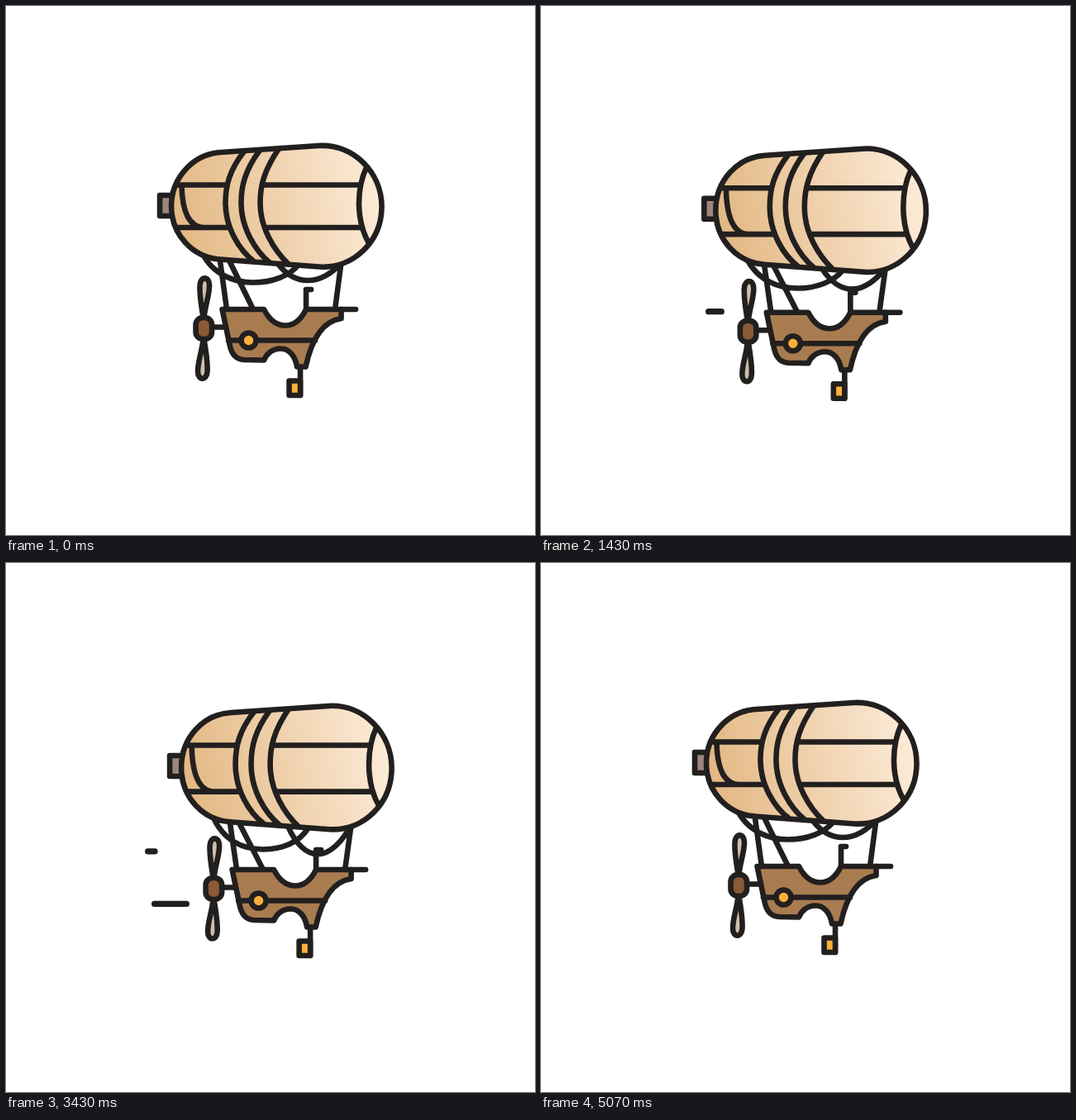
Animation of 640 by 640 pixels, one loop 5140 ms. Source, as an HTML page:

```html
<!DOCTYPE html>
<html lang="en">
<head>
<meta charset="utf-8">
<title>Airship</title>
<style>
html, body { margin: 0; width: 100%; height: 100%; overflow: hidden; background: #fff; }
svg { display: block; width: 100vw; height: 100vh; }
</style>
</head>
<body>
<svg viewBox="0 0 640 640">
  <defs>
    <linearGradient id="skin" gradientUnits="userSpaceOnUse" x1="212" y1="262" x2="448" y2="212">
      <stop offset="0" stop-color="#e3b985"/>
      <stop offset="1" stop-color="#fdebd8"/>
    </linearGradient>
  </defs>
  <g id="ship" fill="none" stroke="#221f1f" stroke-width="6.6" stroke-linecap="round" stroke-linejoin="round">
    <path id="streaks" stroke-width="7.2"/>
    <path id="ropes" stroke-linecap="butt"/>
    <path fill="#9c877e" d="M186 229H202V254H186Z"/>
    <path id="body" fill="url(#skin)"/>
    <path id="seams" stroke-linecap="butt"/>
    <path d="M250 388.5H266M363 367V343H369M356 436V471"/>
    <path fill="#a97c50" d="M261.5 367H312C317 377 325 386.5 338 386.5C350 386.5 358 377 363 367H405.5V378C383 381 370 402 362.5 436.5H352C350 424 343 414.5 332 414.5C322 414.5 315 421 312 428.5L288 428C277 427.5 273 420 271 412Z"/>
    <path d="M405 367H423M269 404.5H374"/>
    <circle cx="293.5" cy="404.5" r="9" fill="#fbae3c"/>
    <path id="lamp" fill="#fbb03b"/>
    <path id="blades" fill="#cec0a8"/>
    <rect x="229.5" y="377" width="19.5" height="26" rx="8.5" fill="#8a5a36"/>
  </g>
</svg>
<script>
const LOOP = 5140, FRAME = LOOP / 72;
const el = id => document.getElementById(id);
const [ship, streaks, ropes, body, seams, lamp, blades] =
  ['ship', 'streaks', 'ropes', 'body', 'seams', 'lamp', 'blades'].map(el);
const clamp = v => Math.max(0, Math.min(1, v));
const ease = p => (1 - Math.cos(Math.PI * p)) / 2;

// propeller span: [step, scale]
const SPAN = [[0, 1], [2, 1], [13, 0], [20, 1], [23.5, 1], [35.7, 0], [48, 1], [59, 0], [71, 1], [72, 1]];
// wind streaks: [start ms, y]
const WIND = [
  [246, 366.5], [453, 407.5], [770, 390], [1322, 366], [1600, 425], [1900, 350], [2205, 393],
  [2523, 436], [2890, 345], [3156, 408.5], [3600, 380], [4045, 362], [4450, 400]
];

function span(t) {
  const f = t / FRAME;
  const i = Math.max(1, SPAN.findIndex(k => k[0] > f));
  const [a, b] = [SPAN[i - 1], SPAN[i]];
  return a[1] + (b[1] - a[1]) * ease((f - a[0]) / (b[0] - a[0]));
}

function drawWind(t) {
  return WIND.map(([start, y]) => {
    const u = (t - start) / 600;
    if (u <= 0 || u >= 1) return '';
    const head = 207 - 47.5 * clamp(u / 0.55);
    const tail = 207 - 47.5 * clamp((u - 0.45) / 0.55);
    return `M${tail} ${y}H${head}`;
  }).join('');
}

function drawBody(b) {
  const m = b / 2;
  return `M260 177L378 169C420 166.5 454.5 ${201 + m / 2} 454.5 ${242.5 + m}` +
    `C454.5 ${285 + b} 420 ${318 + b} 379 ${315.5 + b}L259 ${306.5 + b}` +
    `C226 ${304 + b} 200 ${277 + b} 200 ${242 + m}C200 207 227 179 260 177Z`;
}

function drawSeams(b, low) {
  const hoop = (x, top, end) => `M${x + 22.5} ${top}C${x + 5} 198 ${x - 0.5} 218 ${x} ${240 + b / 2}` +
    `C${x + 0.5} ${268 + b} ${x + 16} ${295 + b} ${x + 34.5} ${end + b}`;
  return hoop(265.5, 176, 309) + hoop(284.5, 174.5, 310.5) + hoop(307.5, 172.5, 312.5) +
    `M206 216.5H268M311 216.5H429M206 ${low}H271M314 ${low}H431` +
    `M212.5 217C213 245 219 ${low - 2} 238 ${low}` +
    `M436 195C423.5 222 423.5 ${260 + b} 439 ${287 + b}`;
}

function drawRopes(b, sag) {
  const l = 334.5 + 9.5 * sag, r = 332 + 19.5 * sag;
  return `M258.5 ${305 + b}L267 367M269.5 ${307 + b}L299 367M405.5 ${310 + b}L398 367` +
    `M239 ${302 + b}C252 ${l - 10} 275 ${l} 299 ${l}C322 ${l} 343 ${l - 8} 354 ${313 + b}` +
    `M329 ${312 + b}C339 ${r - 7 - 5 * sag} 352 ${r} 365 ${r}` +
    `C380 ${r} 395 ${r - 9 - 8 * sag} 405 ${311 + b}`;
}

function drawBlades(s) {
  if (s < 0.004) return '';
  const blade = k => {
    const p = (x, y) => `${239 + k * (x - 239)} ${390 - k * (14 + (376 - y) * s)} `;
    return `M${p(238.4, 376)}C${p(236, 362)}${p(234, 347)}${p(234.5, 338)}` +
      `C${p(235, 326.5)}${p(246, 326.5)}${p(246, 338)}` +
      `C${p(246, 350)}${p(241, 362)}${p(239.6, 376)}Z`;
  };
  return blade(1) + blade(-1);
}

function draw(t) {
  const drift = (1 + Math.cos(2 * Math.PI * (t - 2470) / LOOP)) / 2;
  const sag = ease(clamp(1 - Math.abs(t - 2820) / 2330));
  const swell = 4 * drift;
  const s = span(t), tilt = 2.7 * (1 - s);
  ship.setAttribute('transform', `translate(${17.5 * drift} ${5.7 * drift})`);
  streaks.setAttribute('d', drawWind(t));
  ropes.setAttribute('d', drawRopes(swell, sag));
  body.setAttribute('d', drawBody(swell));
  seams.setAttribute('d', drawSeams(swell, 268 + 6.8 * drift));
  lamp.setAttribute('d', `M342.5 ${453.5 + tilt}L356 453.5V471L342.5 ${471 + tilt}Z`);
  blades.setAttribute('d', drawBlades(s));
}

const begin = performance.now();
function tick() {
  draw((performance.now() - begin) % LOOP);
  requestAnimationFrame(tick);
}
draw(0);
requestAnimationFrame(tick);
</script>
</body>
</html>
```
